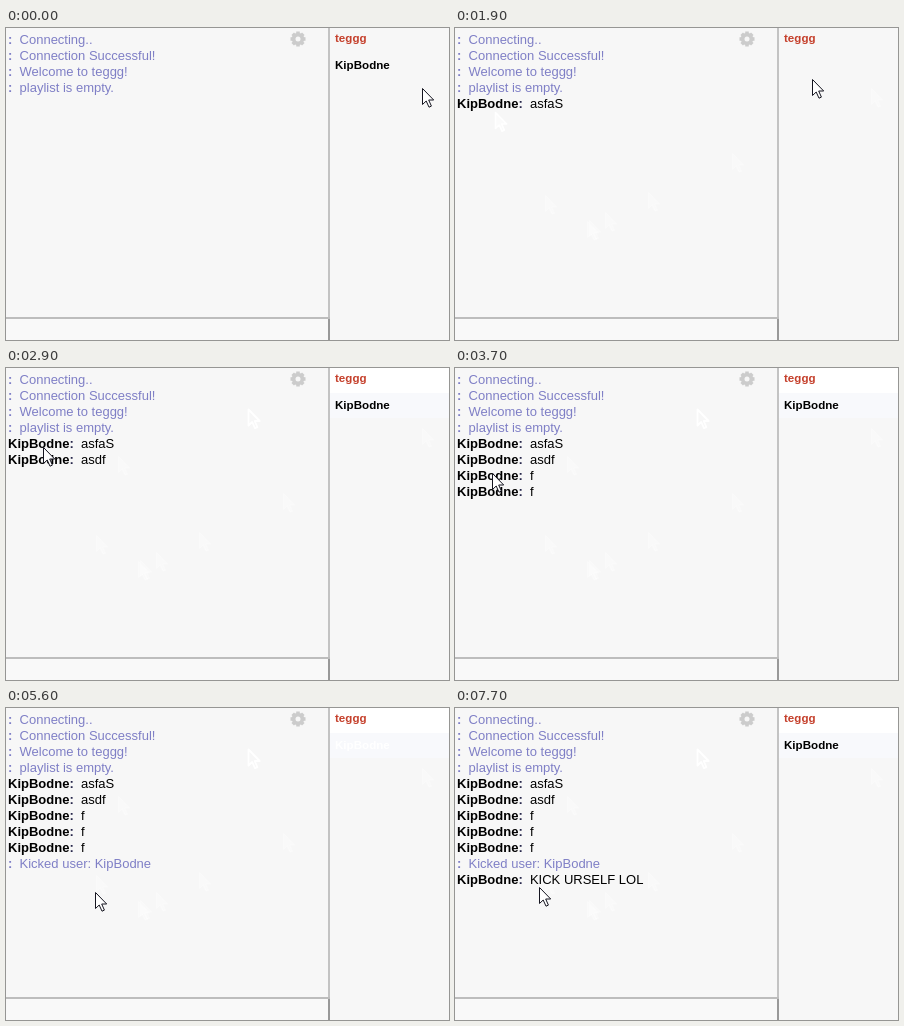
Write an HTML page with a canvas that moves like this. It is 443 px wide and 312 px high and loops after 8 s.

```html
<!DOCTYPE html>
<html lang="en">
<head>
<meta charset="utf-8">
<title>Chat room</title>
<style>
html, body { margin: 0; width: 100%; height: 100%; overflow: hidden; background: #f7f7f7; }
canvas { display: block; width: 443px; height: 312px; }
</style>
</head>
<body>
<canvas id="stage"></canvas>
<script>
const W = 443, H = 312, LOOP = 8000, STEP = 100;
const BG = '#f7f7f7', BLUE = '#7f7fc6', ROOM = 'teggg', USER = 'KipBodne';
const SANS = '"Liberation Sans", Arial, sans-serif';

const canvas = document.getElementById('stage');
const ctx = canvas.getContext('2d');
const ratio = window.devicePixelRatio || 1;
canvas.width = W * ratio;
canvas.height = H * ratio;

const say = (time, text) => ({ time, text, sender: USER });
const notice = (time, text) => ({ time, text, sender: '' });
const lines = [
  notice(0, 'Connecting..'),
  notice(0, 'Connection Successful!'),
  notice(0, `Welcome to ${ROOM}!`),
  notice(0, 'playlist is empty.'),
  say(400, 'asfaS'),
  say(2800, 'asdf'),
  ...[3100, 3500, 3900].map(time => say(time, 'f')),
  notice(4400, `Kicked user: ${USER}`),
  say(7600, 'KICK URSELF LOL')
];

// Each move eases the pointer from where it rests to a new spot.
const home = { x: 416, y: 60 };
const move = (from, to, x, y) => ({ from, to, x, y });
const moves = [
  move(0, 500, 132, 193),
  move(500, 600, 90, 167),
  move(800, 1000, 40, 84),
  move(1100, 1200, 44, 71),
  move(1700, 1800, 112, 88),
  move(1800, 2100, 460, 36),
  move(2300, 2400, 242, 41),
  move(2400, 2900, 37, 79),
  move(3000, 3200, 37, 88),
  move(3400, 3700, 37, 105),
  move(4000, 4200, 31, 110),
  move(4400, 5200, 84, 174),
  move(5200, 5600, 89, 184),
  move(6200, 6700, 98, 175),
  move(7200, 7300, 84, 179)
];

const arrow = new Path2D('M.5 .5V16.5L4.2 13L7 19.2L9.4 18.1L6.7 12H11.7Z');
const hand = new Path2D('M.5 2Q.5 .5 2 .5T3.5 2V7Q6 6 6.5 8Q9 7.2 9.3 9Q11.5 8.5 11.5 11V15Q11.5 17 10 19V22.5H.5V20L-4.5 13.5Q-6 11.5-4.5 10.8T-1.8 11.5L.5 14Z');

const within = (t, from, to) => t >= from && t < to;
const easeOut = p => 1 - (1 - p) ** 3;

function pointerAt(t) {
  let { x, y } = home;
  for (const m of moves) {
    if (t <= m.from) break;
    const p = easeOut(Math.min(1, (t - m.from) / (m.to - m.from)));
    x += (m.x - x) * p;
    y += (m.y - y) * p;
  }
  return [Math.round(x), Math.round(y)];
}

function box(x, y, w, h, color) {
  ctx.fillStyle = color;
  ctx.fillRect(x, y, w, h);
}

function disc(r, color) {
  ctx.beginPath();
  ctx.arc(0, 0, r, 0, 2 * Math.PI);
  ctx.fillStyle = color;
  ctx.fill();
}

function text(str, x, y, color, size, bold) {
  ctx.font = `${bold ? 'bold ' : ''}${size}px ${SANS}`;
  ctx.fillStyle = color;
  ctx.fillText(str, x, y);
  return x + ctx.measureText(str).width;
}

function shape(outline, [x, y], fill, stroke, width = 1) {
  ctx.save();
  ctx.translate(x, y);
  ctx.lineWidth = width;
  ctx.lineJoin = 'round';
  ctx.fillStyle = fill;
  ctx.strokeStyle = stroke;
  ctx.fill(outline);
  ctx.stroke(outline);
  ctx.restore();
}

function gear(x, y) {
  ctx.save();
  ctx.translate(x, y);
  ctx.fillStyle = '#cccccc';
  for (let i = 0; i < 8; i++) {
    ctx.fillRect(-1.8, -7.5, 3.6, 4);
    ctx.rotate(Math.PI / 4);
  }
  disc(6.2, '#cccccc');
  disc(2.5, BG);
  ctx.restore();
}

function userList(t) {
  if (t >= 2100) {
    box(324, 0, 119, 25, '#ffffff');
    if (t < 2400) box(324, 25, 119, 27, '#d0e0f9');
    else box(324, 25, 119, 25, '#f8f9fc');
  }
  text(ROOM, 329, 14, '#c5402c', 11.6, true);
  const color = within(t, 4600, 6500) ? '#ffffff' : '#000000';
  if (!within(t, 300, 2100)) text(USER, 329, 41, color, 11.6, true);
}

function frame() {
  box(322, 0, 2, 290, '#c3c3c3');
  box(0, 291, 322, 21, '#f9f9f9');
  box(0, 289, 324, 2, '#bdbdbd');
  box(322, 291, 2, 21, '#999999');
  gear(292, 11);
}

function chat(t) {
  lines.forEach(({ time, text: message, sender }, i) => {
    if (t < time) return;
    const y = 16 + 16 * i;
    let x = text(sender, 2, y, '#000000', 13, true);
    x = text(':', x, y, sender ? '#26264a' : BLUE, 13, true);
    text('\u00a0\u00a0' + message, x, y, sender ? '#000000' : BLUE, 13);
  });
}

// Pale prints stay behind where the pointer has been.
function trail(t) {
  ctx.globalAlpha = 0.3;
  for (let s = 0; s <= 1800; s += s < 600 ? STEP : 1200) {
    if (t > s + STEP) shape(arrow, pointerAt(s), '#ffffff', '#ffffff');
  }
  ctx.globalAlpha = 1;
  if (within(t, 1800, 2900)) shape(arrow, pointerAt(1000), '#fbfbfb', '#ffffff', 1.6);
  if (t >= 2500) shape(arrow, pointerAt(2400), BG, '#ffffff', 1.8);
}

function draw(t) {
  ctx.setTransform(ratio, 0, 0, ratio, 0, 0);
  box(0, 0, W, H, BG);
  userList(t);
  frame();
  trail(t);
  chat(t);
  const overName = within(t, 1200, 1800) || within(t, 4200, 4500);
  shape(overName ? hand : arrow, pointerAt(t), '#ffffff', '#151520');
}

function tick() {
  draw(Math.floor((performance.now() % LOOP) / STEP) * STEP);
  requestAnimationFrame(tick);
}
tick();
</script>
</body>
</html>
```
